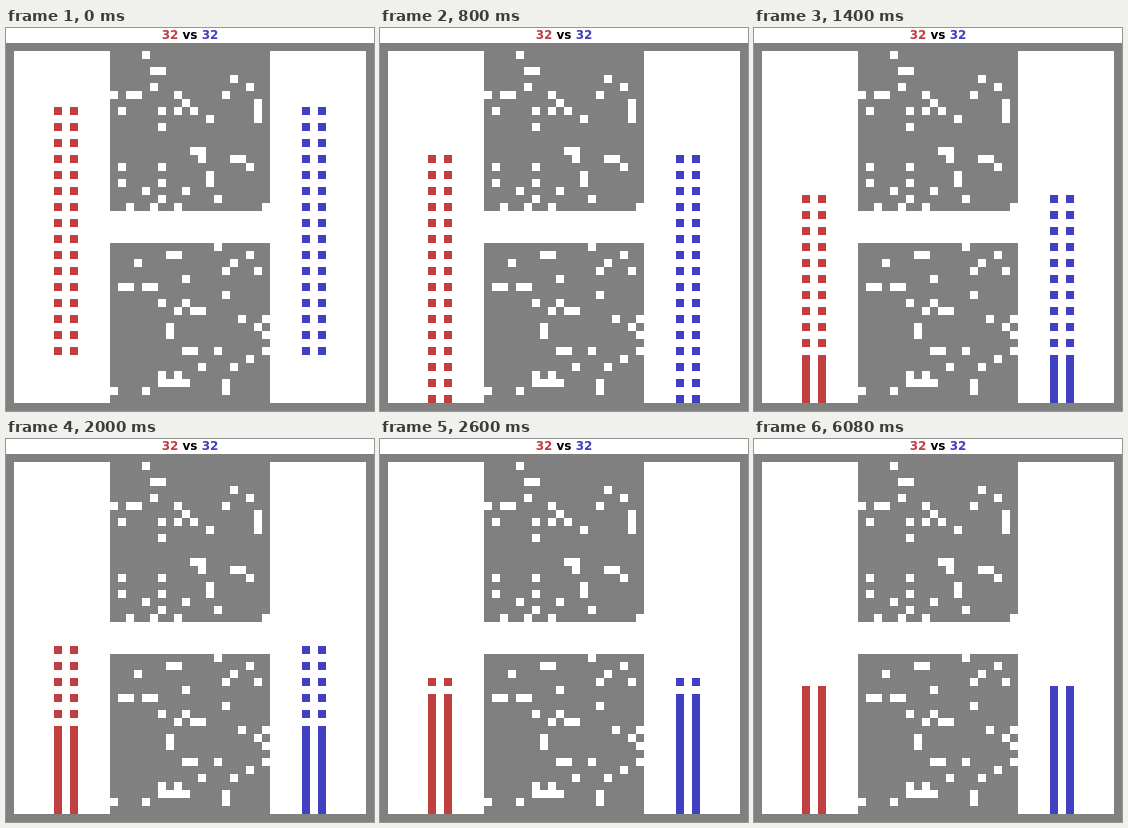
Write an HTML page with a canvas that moves like this. It is 368 px wide and 383 px high and loops after 8000 ms.

```html
<!DOCTYPE html>
<html lang="en">
<head>
<meta charset="utf-8">
<title>Grid battle</title>
<style>
  html, body { margin: 0; width: 368px; height: 383px; overflow: hidden; background: #fff; }
  canvas { position: absolute; left: 0; top: 0; }
  h1 {
    position: absolute; left: 0; top: 0; width: 368px; margin: 0;
    font: bold 12px/14px "DejaVu Sans", sans-serif; text-align: center; color: #000;
  }
  .red { color: #c04040; }
  .blue { color: #4040c0; }
</style>
</head>
<body>
<canvas width="368" height="383"></canvas>
<h1><span class="red">32</span> vs <span class="blue">32</span></h1>
<script>
const CELL = 8, TOP = 15, LOOP = 8000;
const WALL = '#808080', FLOOR = '#fff', RED = '#c04040', BLUE = '#4040c0';
const ctx = document.querySelector('canvas').getContext('2d');

// Open columns in the central walls, by row
const holes = {
  1: [17], 3: [18, 19], 4: [28], 5: [18, 30], 6: [13, 15, 16, 21, 27],
  7: [22, 31], 8: [14, 19, 21, 23, 31], 9: [25, 31], 10: [19],
  13: [23, 24], 14: [24, 28, 29], 15: [14, 19, 30], 16: [25],
  17: [14, 19, 25], 18: [17, 22], 19: [19, 26], 20: [15, 18, 21, 32],
  25: [26], 26: [20, 21, 30], 27: [16, 28], 28: [27, 31], 29: [22],
  30: [14, 15, 17, 18], 31: [27], 32: [19, 22], 33: [21, 23, 24],
  34: [29, 32], 35: [20, 31], 36: [20, 32], 38: [22, 23, 26, 32],
  39: [30], 40: [24, 28], 41: [19, 21], 42: [19, 20, 21, 22, 27],
  43: [13, 17, 27]
};

// Row of the topmost unit at each step
const leadRows = [8, 10, 14, 19, 24, 28, 29];

function fill(color, col, row, w = 1, h = 1) {
  ctx.fillStyle = color;
  ctx.fillRect(col * CELL, TOP + row * CELL, w * CELL, h * CELL);
}

function drawMap() {
  fill(WALL, 0, 0, 46, 46);
  fill(FLOOR, 1, 1, 44, 44);
  fill(WALL, 13, 1, 20, 20);
  fill(WALL, 13, 25, 20, 20);
  for (const row in holes) holes[row].forEach(col => fill(FLOOR, col, row));
}

function drawTeam(color, col, step) {
  for (let i = 0; i < 16; i++) {
    // Units keep their spacing until they pile up on the bottom wall
    const row = Math.min(leadRows[step] + 2 * i, 29 + i);
    fill(color, col, row);
    fill(color, col + 2, row);
  }
}

let start;
function frame(now) {
  start ??= now;
  const t = (now - start) % LOOP;
  const step = Math.min(6, Math.floor((t + 400) / 600));
  drawMap();
  drawTeam(RED, 6, step);
  drawTeam(BLUE, 37, step);
  requestAnimationFrame(frame);
}
requestAnimationFrame(frame);
</script>
</body>
</html>
```
